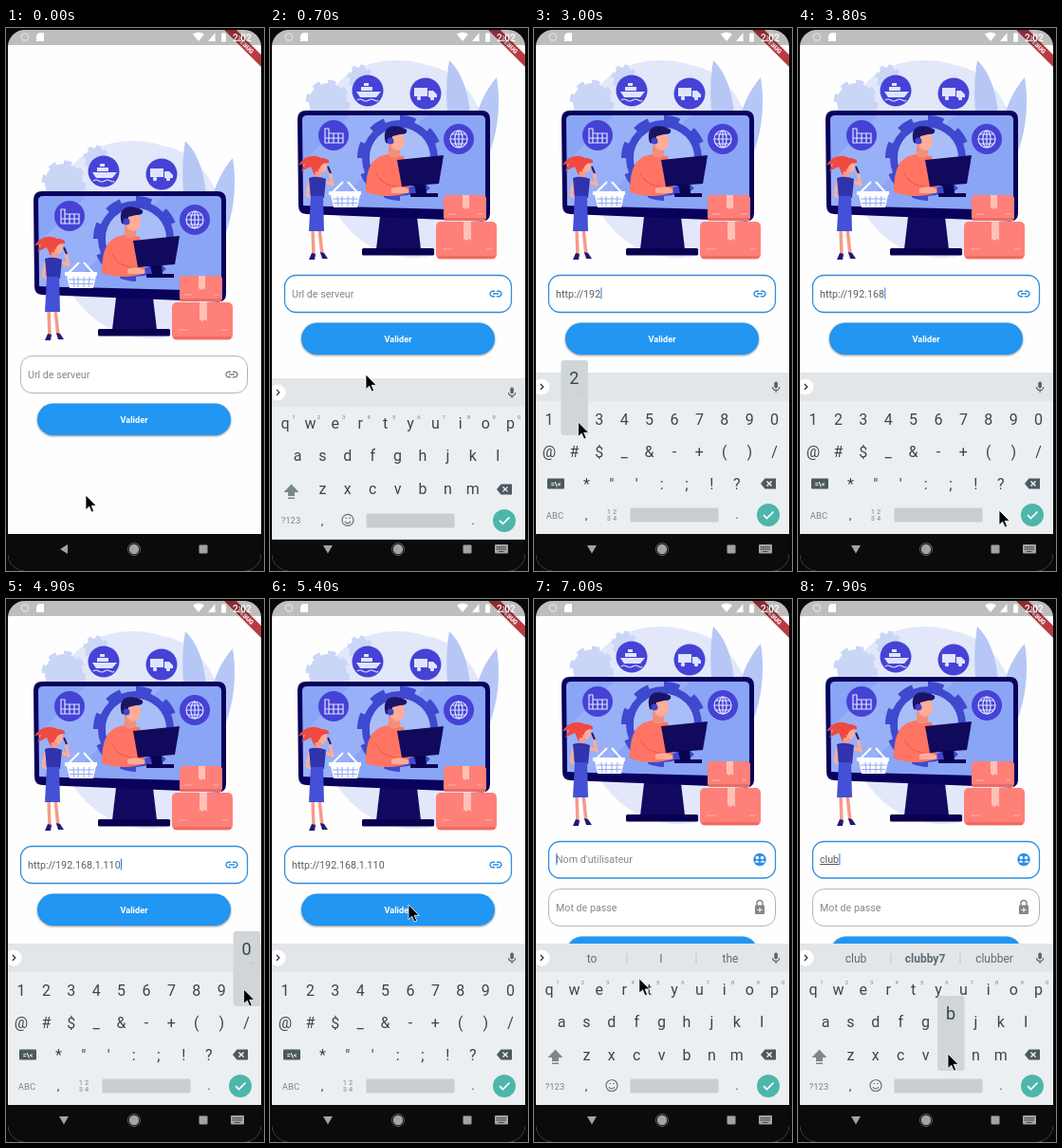
Write an HTML page that moves like this. It is 272 by 572 pixels and loops after 8 s.

```html
<!DOCTYPE html>
<html lang="fr">
<head>
<meta charset="utf-8">
<title>Url de serveur</title>
<style>
html, body { margin: 0; width: 100%; height: 100%; overflow: hidden; background: #080808; }
svg { display: block; width: 100vw; height: 100vh; font-family: Roboto, sans-serif; }
#art { animation: art 8s infinite; }
#form1 { animation: form1 8s infinite; }
#form2 { opacity: 0; animation: form2 8s infinite; }
#board { animation: board 8s infinite linear; }
#pill { x: 33px; width: 204px; animation: pill 8s infinite ease-in-out; }
#label { animation: label 8s infinite; }
#wait { opacity: 0; animation: wait 8s infinite; }
#spin { transform-origin: 135px 412px; animation: spin .8s -.3s infinite linear; }
.btn { fill: #2196f3; filter: drop-shadow(0 1px 1.2px #0007); }
.cap { fill: #fff; font-size: 9.2px; font-weight: 700; text-anchor: middle; }
.field { fill: #fff; stroke: #b4b4b4; }
.on { stroke: #2f8fe3; stroke-width: 1.3; }
.in { font-size: 10.7px; fill: #5c5c5c; }
.hint { fill: #868686; }
.key { font-size: 16px; fill: #37474f; text-anchor: middle; }
.sub { font-size: 6px; fill: #78858c; text-anchor: middle; }
.small { font-size: 9.5px; fill: #78858c; text-anchor: middle; }
.tip { font-size: 12px; fill: #5f6b72; text-anchor: middle; }
@keyframes art {
  0%, 6.8% { transform: none; }
  8%, 81.3% { transform: translateY(-85px); }
  83%, 100% { transform: translateY(-90px); }
}
@keyframes form1 {
  0%, 6.8% { transform: none; opacity: 1; }
  8%, 81.3% { transform: translateY(-85px); opacity: 1; }
  83%, 100% { transform: translateY(-85px); opacity: 0; }
}
@keyframes form2 { 0%, 81.3% { opacity: 0; } 83%, 99.99% { opacity: 1; } 100% { opacity: 0; } }
@keyframes board {
  0%, 6.2% { transform: translateY(180px); }
  7.4% { transform: translateY(60px); }
  8.75% { transform: translateY(6px); }
  9.6%, 100% { transform: none; }
}
@keyframes pill { 0%, 68.2% { x: 33px; width: 204px; } 72%, 100% { x: 118px; width: 34px; } }
@keyframes label { 0%, 68.2% { opacity: 1; } 69.5%, 100% { opacity: 0; } }
@keyframes wait { 0%, 71% { opacity: 0; } 72.5%, 99.9% { opacity: 1; } 100% { opacity: 0; } }
@keyframes spin { to { transform: rotate(360deg); } }
</style>
</head>
<body>
<svg viewBox="0 0 272 572" preserveAspectRatio="none">
<defs>
  <clipPath id="screen"><rect x="2" y="2" width="267" height="570" rx="18"/></clipPath>
  <clipPath id="above"><rect width="272" height="539"/></clipPath>
  <g id="link" fill="none" stroke="currentColor" stroke-width="1.4">
    <path d="M-1-2.8H-3.2a2.8 2.8 0 0 0 0 5.6H-1M1-2.8H3.2a2.8 2.8 0 0 1 0 5.6H1M-3 0H3"/>
  </g>
</defs>
<g clip-path="url(#screen)">
<rect width="272" height="572" fill="#fefefe"/>

<g id="art">
  <path d="M58 165C75 120 130 112 165 124C205 130 235 175 232 235C230 290 200 328 150 327C95 326 50 275 52 215Z" fill="#e2e8fa"/>
  <g fill="#b6c7f6">
    <path d="M189 119C211 140 217 185 207 240C188 205 182 160 189 119Z"/>
    <path d="M239 137C245 175 238 215 214 250C207 205 216 163 239 137Z"/>
  </g>
  <g fill="#cad6f6" stroke="#cad6f6">
    <circle cx="61" cy="163" r="19"/>
    <circle cx="61" cy="163" r="20" stroke-width="7" pathLength="16" stroke-dasharray="1"/>
    <circle cx="95" cy="137" r="10"/>
    <circle cx="95" cy="137" r="11" stroke-width="5" pathLength="16" stroke-dasharray="1"/>
  </g>

  <path d="M116 284h39l4 34h-47Z" fill="#120a60"/>
  <rect x="97" y="317" width="76" height="7.5" rx="1.5" fill="#08004f"/>
  <path d="M38 172H223Q232 172 232 181V280Q232 289 223 288.500L38 281Q30 280.500 30 272L29 181Q29 172 38 172Z" fill="#09015c"/>
  <path d="M39 177H222Q227 177 227 182V277L35 272L34 182Q34 177 39 177Z" fill="#8aa5f6"/>
  <path d="M35 226L84 177H165L66 273L35 272Z" fill="#98b0f8"/>

  <g fill="none" stroke="#3f49cf">
    <circle cx="137" cy="222" r="36" stroke-width="8"/>
    <circle cx="137" cy="222" r="41" stroke-width="8" pathLength="16" stroke-dasharray="1"/>
  </g>
  <circle cx="137" cy="222" r="32" fill="#a9bdf9"/>

  <path d="M101 258C101 231 108 221 124 218L141 220L147 258Q125 266 101 258Z" fill="#ff7462"/>
  <path d="M112 238Q118 254 143 252" fill="none" stroke="#e85a48"/>
  <path d="M125 208h12v11q-7 5-12 0Z" fill="#f08f7c"/>
  <ellipse cx="134" cy="204" rx="8" ry="10" fill="#ffac98"/>
  <path d="M122 206C117 189 129 184 144 192Q146 197 137 197L129 199L128 207Z" fill="#1b1465"/>
  <circle cx="127" cy="204" r="3.5" fill="#3f45cb"/>
  <path d="M134 224L183 219L178 249L139 252Z" fill="#110a5c"/>
  <path d="M152 250h12l1 9h12v4h-29v-4h6Z" fill="#0a0352"/>
  <path d="M128 254q10-4 18 1v4h-18Z" fill="#ffac98"/>

  <g fill="#4642d6">
    <circle cx="103" cy="151" r="16.5"/><circle cx="164" cy="154" r="16.5"/>
    <circle cx="67" cy="198" r="16"/><circle cx="199" cy="202" r="16"/>
  </g>
  <g fill="#dfe5ff">
    <path d="M91 152H117L112 158H95ZM96 147h12v4H96ZM99 143h5v3h-5Z"/>
    <path d="M152 148h14v9h-14ZM167 151h5l4 4v3h-9Z"/>
    <circle cx="157" cy="159" r="2.200"/><circle cx="171" cy="159" r="2.200"/>
  </g>
  <g fill="none" stroke="#dfe5ff" stroke-width="1.200">
    <path d="M92 161q3-2 6 0t6 0 6 0 4 0"/>
    <path d="M58 206V191h4v5H77V206ZM62 196v10M67 196v10M72 196v10M58 201H77"/>
    <circle cx="199" cy="202" r="9"/><ellipse cx="199" cy="202" rx="4" ry="9"/>
    <path d="M190 202h18M199 193v18M192 197h14M192 207h14"/>
  </g>

  <path d="M66 258l11-11M92 258l-10-11" stroke="#fff" stroke-width="2"/>
  <path d="M62 257H96v4H95L92 274H67L64 261H62Z" fill="#fff"/>
  <path d="M66 265H93M67 269.500H92M71 262l1 11M76 262v11M82 262v11M88 262l-1 11" stroke="#90a9f3"/>

  <path d="M45 296l1 30M52 296l3 28" stroke="#f59b88" stroke-width="3.500"/>
  <path d="M44 322l4 1-1 6h-6ZM53 321l4 1 4 6h-6Z" fill="#221b78"/>
  <path d="M54 222C44 217 36 221 30 229L37 228L33 236L43 231L47 240L55 232Z" fill="#f0493f"/>
  <ellipse cx="55" cy="231" rx="5" ry="6.500" fill="#ffac98"/>
  <path d="M46 231q0-10 10-9q7 1 6 5q-8-1-10 7Z" fill="#f0493f"/>
  <path d="M48 236h6v8h-7Z" fill="#f59b88"/>
  <path d="M57 246l9 4-3-13M42 246l-3 15 12 6" fill="none" stroke="#ffac98" stroke-width="3.200" stroke-linejoin="round"/>
  <path d="M41 243q8-3 18 1l-2 20H43Z" fill="#2f33ad"/>
  <path d="M43 262h13l1 37H41Z" fill="#4450d6"/>
  <path d="M61 231l3 7" stroke="#221b78" stroke-width="2"/>

  <g fill="#ff8078">
    <rect x="183" y="261" width="45" height="27" rx="4"/>
    <rect x="175" y="289" width="64" height="39.500" rx="5"/>
  </g>
  <path d="M184 285h43v3h-43ZM177 325h60v3h-60Z" fill="#f06b63"/>
  <path d="M203 261h7v15l-2-2-2 2-3-2ZM204 289h8v20l-2-2-3 2-3-2Z" fill="#ffc1b5"/>
  <path d="M188 281h8M219 281h5M182 318h10M227 318h7" stroke="#ffb0a6"/>
</g>

<g id="form1">
  <rect id="box1" class="field" x="15.500" y="345.500" width="239" height="39" rx="12"/>
  <text id="url" class="in" x="23" y="368.500"></text>
  <use id="link1" href="#link" x="238" y="365"/>
  <rect id="pill" class="btn" y="395.500" height="33.500" rx="16.750"/>
  <text id="label" class="cap" x="135" y="415.500">Valider</text>
  <g id="wait"><path id="spin" d="M128.500 407A8.200 8.200 0 0 1 140 405.500" fill="none" stroke="#fff" stroke-width="1.600"/></g>
</g>

<g id="form2">
  <rect id="box2" class="field" x="15.500" y="255.500" width="239" height="38.500" rx="12"/>
  <text id="user" class="in" x="23" y="278"></text>
  <g id="people">
    <circle cx="238" cy="274.500" r="6.700" fill="currentColor"/>
    <g fill="#fff"><circle cx="235.400" cy="272.500" r="1.800"/><circle cx="240.600" cy="272.500" r="1.800"/>
    <path d="M232.400 277.500q2.600-4 5.200 0ZM238.400 277.500q2.600-4 5.200 0Z"/></g>
  </g>
  <rect class="field" x="15.500" y="305.500" width="239" height="39" rx="12"/>
  <text class="in hint" x="23" y="328.500">Mot de passe</text>
  <path d="M235 323v-2.500a3 3 0 0 1 6 0v2.500" fill="none" stroke="#858585" stroke-width="1.400"/>
  <rect x="233" y="322.500" width="10" height="9.500" rx="1" fill="#858585"/>
  <path d="M238 325v5M235.500 327.500h5" stroke="#fff"/>
  <rect class="btn" x="34" y="355.500" width="202" height="34" rx="17"/>
  <text class="cap" x="135" y="376">Valider</text>
</g>
<rect id="caret" width="1" height="12" fill="#2b7fd0"/>

<g transform="translate(269 2) rotate(45)">
  <rect x="-40" y="18.500" width="80" height="9" fill="#ae1a24" opacity=".86"/>
  <text y="25.500" fill="#fff" font-size="6.600" font-weight="900" text-anchor="middle">DEBUG</text>
</g>
<rect x="2" y="2" width="267" height="16" fill="#000" opacity=".25"/>
<g fill="#fff">
  <circle cx="20" cy="9.500" r="3.700" fill="none" stroke="#fff" stroke-width="1.500" opacity=".45"/>
  <path d="M34.500 5H40v9h-8V7.500Z"/>
  <path d="M197 6.500q6-4 12 0l-6 7.500ZM213 14l7.500-9v9ZM227 6h1.500V5h2v1H232v8.500h-5Z"/>
  <text x="239" y="13.500" font-size="10" font-weight="500">2:02</text>
</g>

<rect y="533" width="272" height="39" fill="#0b0b0b"/>
<g clip-path="url(#above)"><g id="board">
  <rect y="363" width="272" height="170" fill="#eceff1"/>
  <rect y="363" width="272" height="30" fill="#e2e6e9"/>
  <circle cx="8" cy="378" r="8.500" fill="#fff"/>
  <path d="M6.800 375l3 3-3 3" fill="none" stroke="#333" stroke-width="1.300"/>
  <rect x="253.300" y="372.500" width="3.600" height="7" rx="1.800" fill="#56636a"/>
  <path d="M251.500 378a3.600 3.600 0 0 0 7.200 0M255.100 381.500v2.500" fill="none" stroke="#56636a" stroke-width="1.200"/>
  <g id="tips"></g>
  <g id="abc">
    <path d="M22.500 474.500l-8 8.500h4.500v4h7v-4h4.500ZM19 488.500h7v1.500h-7Z" fill="#7a878e"/>
    <circle cx="82" cy="512.500" r="6" fill="none" stroke="#66737a" stroke-width="1.200"/>
    <path d="M79 514q3 4 6 0M79.500 510.500h1.500M83 510.500h1.500" fill="none" stroke="#66737a" stroke-width="1.200"/>
    <text class="small" x="22" y="516.500">?123</text>
  </g>
  <g id="sym">
    <rect x="14" y="474.500" width="18" height="11" rx="1" fill="#4b5960"/>
    <text x="23" y="482.500" font-size="7" font-weight="700" fill="#fff" text-anchor="middle">=\&lt;</text>
    <text class="small" x="22" y="516.500">ABC</text>
    <text class="sub" x="82" y="511.500" style="font-size:7.500px">1 2</text>
    <text class="sub" x="82" y="519" style="font-size:7.500px">3 4</text>
  </g>
  <path d="M239 480l4.500-5.500H255v11H243.500Z" fill="#4b5960"/>
  <path d="M245.500 477.500l5 5m0-5l-5 5" stroke="#fff" stroke-width="1.300"/>
  <rect x="101.500" y="505.500" width="93" height="15" rx="1.500" fill="#c9cdd0"/>
  <text class="key" x="55" y="517" style="font-size:13px">,</text>
  <text class="key" x="214" y="517" style="font-size:13px">.</text>
  <circle cx="247" cy="513" r="12" fill="#4db6ac"/>
  <path d="M242 513l3.500 3.500 7-7" fill="none" stroke="#fff" stroke-width="1.700"/>
  <g id="pop">
    <rect x="-14" y="-62" width="28.500" height="79" rx="3" fill="#d0d5d8"/>
    <text class="key" y="-37" style="font-size:18px"></text>
    <text class="sub" x="7" y="-28">…</text>
  </g>
</g></g>

<g fill="#a3a3a3">
  <path id="back" d="M57 549l8-5v10Z"/>
  <path id="down" d="M56 545h10l-5 8.500Z"/>
  <circle cx="135" cy="549" r="5.200"/>
  <circle cx="135" cy="549" r="6.500" fill="none" stroke="#777" stroke-width=".8"/>
  <rect x="203.500" y="544.500" width="9" height="9" rx="1"/>
  <g id="ime"><rect x="237" y="544" width="14" height="9.500" rx="1"/>
  <path d="M239 546.800h10.500M239 549h10.500M241.500 551.500h5" stroke="#0b0b0b" stroke-dasharray="1.300 .8"/></g>
</g>
</g>
<path id="arrow" d="M0 0V15.500L3.700 12.200L6.200 18L8.700 17L6.200 11.300H11.200Z" fill="#000" stroke="#fff" stroke-width=".8"/>
</svg>
<script>
const $ = id => document.getElementById(id);
const LOOP = 8000, PITCH = 26.4;
const spot = { '.': [215, 509] };

function addText(parent, cls, x, y, str) {
  const el = document.createElementNS('http://www.w3.org/2000/svg', 'text');
  el.setAttribute('class', cls);
  el.setAttribute('x', x);
  el.setAttribute('y', y);
  el.textContent = str;
  parent.append(el);
  return el;
}

function addRow(parent, chars, x0, y) {
  [...chars].forEach((c, i) => {
    const x = x0 + i * PITCH;
    spot[c] = [x, y];
    addText(parent, 'key', x, y + 5.5, c);
  });
}

addRow($('abc'), 'qwertyuiop', 16, 411);
[...'1234567890'].forEach((d, i) => addText($('abc'), 'sub', 25 + i * PITCH, 406, d));
addRow($('abc'), 'asdfghjkl', 29, 445);
addRow($('abc'), 'zxcvbnm', 55.4, 480);
addRow($('sym'), '1234567890', 16, 412);
addRow($('sym'), '@#$_&-+()/', 16, 446);
addRow($('sym'), '*"\':;!?', 55.4, 480);

const tips = [61, 134, 207].map(x => addText($('tips'), 'tip', x, 382.5, ''));
const bars = [98, 171].map(x => addText($('tips'), 'tip', x, 382, '|'));
bars.forEach(b => { b.style.opacity = .3; });

// Keystrokes: time and key
const host = [[2480, '1'], [2740, '9'], [2940, '2'], [3140, '.'], [3280, '1'], [3440, '6'], [3590, '8'],
  [3860, '.'], [4050, '1'], [4250, '.'], [4450, '1'], [4590, '1'], [4850, '0']];
const name = [[7120, 'c'], [7360, 'l'], [7600, 'u'], [7850, 'b']];
const strokes = [...host, ...name];

// Pointer stops: arrival, departure, x, y
const stops = [[0, 100, 84, 492], [360, 750, 101, 365], [1200, 2000, 101, 438], [2200, 2290, 20, 510],
  ...strokes.map(([t, k]) => [t - 60, t + 50, spot[k][0] - 3, spot[k][1] - 1]),
  [5280, 6400, 146, 322], [6720, 6920, 120, 272]].sort((a, b) => a[0] - b[0]);

const guesses = {
  c: ['c', 'can', 'call'], cl: ['cl', 'clear', 'close'],
  clu: ['clu', 'club', 'clue'], club: ['club', 'clubby7', 'clubber']
};

const typed = (list, t) => list.filter(s => s[0] <= t).map(s => s[1]).join('');
const show = (el, on) => { el.style.display = on ? '' : 'none'; };

function pointer(t) {
  const i = stops.findLastIndex(s => s[0] <= t);
  const [, leave, x, y] = stops[i], next = stops[i + 1];
  if (t <= leave || !next) return [x, y];
  const p = (t - leave) / (next[0] - leave), e = p * p * (3 - 2 * p);
  return [x + (next[2] - x) * e, y + (next[3] - y) * e];
}

function fill(el, value, hint) {
  const str = value || hint;
  if (el.textContent !== str) el.textContent = str;
  el.classList.toggle('hint', !value);
}

function render(t) {
  const focus = t >= 420, login = t >= 6550, logged = t >= 6900;
  const letters = t < 2280 || logged;
  const url = t >= 1200 ? 'http://' + typed(host, t) : '';
  const user = typed(name, t);

  fill($('url'), url, 'Url de serveur');
  fill($('user'), user, "Nom d'utilisateur");
  $('user').style.textDecoration = user ? 'underline' : 'none';
  $('box1').classList.toggle('on', focus);
  $('box2').classList.toggle('on', logged);
  $('link1').style.color = focus ? '#2f8fe3' : '#858585';
  $('people').style.color = logged ? '#2f8fe3' : '#858585';

  const last = [420, 1200, ...strokes.map(s => s[0]), 6900].filter(s => s <= t);
  const blink = Math.floor((t - Math.max(...last)) / 500) % 2 === 0;
  const field = login ? $('user') : $('url'), value = login ? user : url;
  show($('caret'), focus && t >= 650 && (!login || logged) && blink && (value || t > 800));
  $('caret').setAttribute('x', 23.3 + (value ? field.getComputedTextLength() : 0));
  $('caret').setAttribute('y', login ? 268 : 273.5);

  show($('abc'), letters);
  show($('sym'), !letters);
  show($('tips'), letters && t >= 900);
  const words = guesses[user] || ['to', 'I', 'the'];
  tips.forEach((el, i) => { el.textContent = words[i]; });
  tips[1].style.fontWeight = user ? 700 : 400;

  const hit = strokes.find(([s, k]) => k !== '.' && t >= s - 10 && t < s + 110);
  show($('pop'), hit);
  if (hit) {
    const [x, y] = spot[hit[1]];
    $('pop').setAttribute('transform', `translate(${x} ${y})`);
    $('pop').children[1].textContent = hit[1];
    show($('pop').children[2], !letters);
  }

  const open = t >= 500;
  show($('back'), !open);
  show($('down'), open);
  show($('ime'), open);
  $('arrow').setAttribute('transform', `translate(${pointer(t)})`);
}

const start = performance.now();
function tick() {
  render((performance.now() - start) % LOOP);
  requestAnimationFrame(tick);
}
tick();
</script>
</body>
</html>
```
